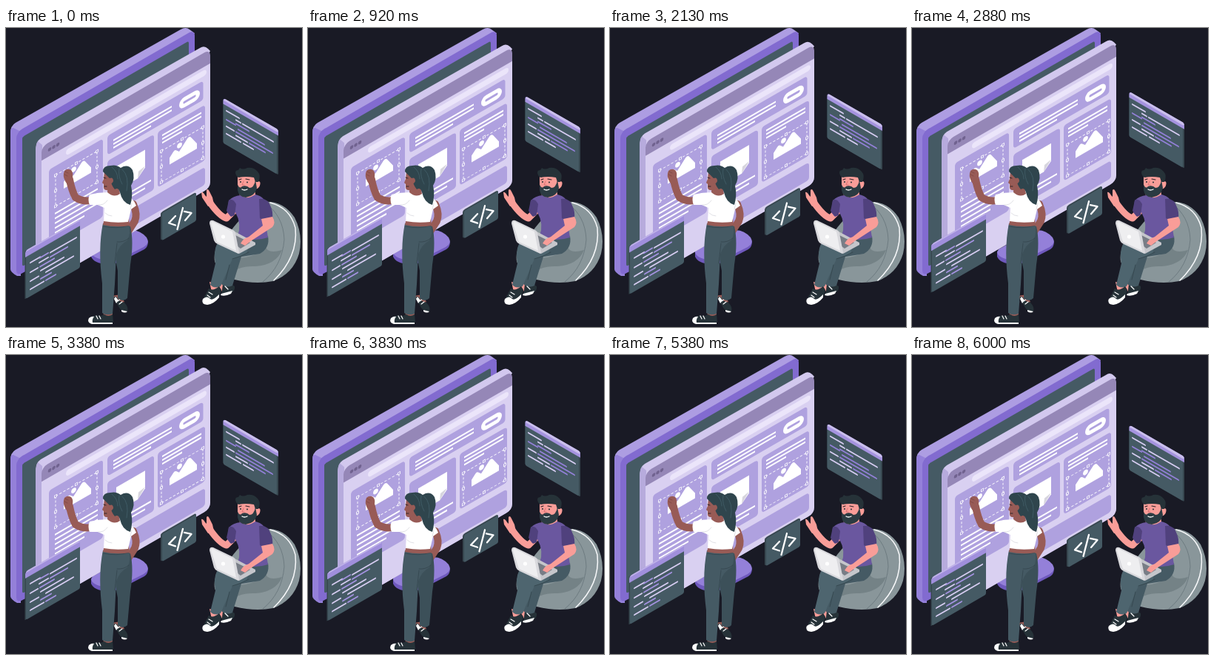
An HTML page that plays this animation: 400 px wide and 404 px high, repeating every 6.04 s.

```html
<!DOCTYPE html>
<html lang="en">
<head>
<meta charset="utf-8">
<title>Floating web design panels</title>
<style>
html,body{margin:0;width:100%;height:100%;overflow:hidden;background:#191a25}
svg{display:block;width:100vw;height:100vh}
.stroke{fill:none;stroke-linecap:round;stroke-linejoin:round}
.card{fill:#afa1df}
.slate{fill:#455a64}
.skin{fill:#985b56}
.pink{fill:#f99d98}
.ink{fill:#263238}
.white{fill:#fff}
</style>
</head>
<body>
<svg viewBox="0 0 400 404" preserveAspectRatio="none">
<defs>
  <g id="picture">
    <rect x="67" y="237.5" width="56" height="42" fill="none" stroke="#fff" stroke-width=".9" stroke-dasharray="3 2.2"/>
    <path fill="#afa1df" stroke="#fff" stroke-width=".8" d="M65.500 236h3v3h-3zM93.500 236h3v3h-3zM121.500 236h3v3h-3zM65.500 257h3v3h-3zM121.500 257h3v3h-3zM65.500 278h3v3h-3zM93.500 278h3v3h-3zM121.500 278h3v3h-3z"/>
    <path class="white" d="M78 262V253L83 248Q85 246 87 248L91 252 102 241Q105 239 107 242L115 255V262Z"/>
    <circle class="white" cx="91.500" cy="244" r="3.400"/>
  </g>
</defs>

<!-- monitor -->
<path fill="#6f59bd" d="M115 302V309Q119 318 136 319 150 319 160 313L187 299Q192 296 192 288L150 280Z"/>
<path fill="#9480d9" d="M117 299L160 275Q178 269 190 283 195 291 186 296L160 309Q148 315 133 313 117 311 115 303Z"/>
<path fill="#ad9de2" d="M6 142Q6 132 13 128L236 2Q243-2 248 2L255 7 240 30 16 155Z"/>
<path fill="#9480d9" d="M6 141Q6 134 10 135L20 140V335L15 335Q6 330 6 326Z"/>
<g class="iso">
  <rect x="14" y="149" width="241" height="195" rx="8" fill="#826bd0"/>
  <rect class="slate" x="22" y="160" width="225" height="175" rx="3"/>
</g>

<g id="float">
  <!-- browser window -->
  <path fill="#d2c8ee" d="M40 168Q40 153 47 149L262 27Q268 23 273 28L276 31 260 60 48 185V341L40 337Z"/>
  <path fill="#b7abdd" d="M40 168Q40 156 43 153L49 158V341L40 337Z"/>
  <g class="iso">
    <rect x="48" y="188" width="228" height="187" rx="8" fill="#9587b7"/>
    <path fill="#d9d0f1" d="M48 207H276V367Q276 375 268 375H56Q48 375 48 367Z"/>
    <g fill="#70628f"><circle cx="59" cy="198" r="2.300"/><circle cx="64.500" cy="198" r="2.300"/><circle cx="70" cy="198" r="2.300"/></g>
    <rect x="81" y="211.500" width="190" height="8" rx="4" fill="#ebe5fa"/>
    <g class="card">
      <rect x="58" y="225" width="73" height="106" rx="4"/>
      <rect x="137" y="225" width="129.500" height="26" rx="4"/>
      <rect x="137" y="259" width="63" height="75" rx="4"/>
      <rect x="205" y="259" width="64" height="75" rx="4"/>
      <rect x="137" y="343" width="132" height="24" rx="4"/>
    </g>
    <rect class="white" x="234" y="232.500" width="28" height="14" rx="7"/>
    <path class="stroke" stroke="#afa1df" stroke-width="3.200" d="M241 239.500H255"/>
    <use href="#picture"/>
    <use href="#picture" x="143" y="50"/>
    <path class="white" d="M149 273H188V297L178 306H149Z"/>
    <path fill="#d7d5de" d="M188 295L178 306 179 297Z"/>
    <path id="copy" class="stroke" stroke="#fff" stroke-width="2.300" style="stroke-linecap:butt"/>
  </g>

  <!-- left code panel -->
  <g class="iso">
    <rect x="25.500" y="316" width="3" height="65" fill="#37474f"/>
    <rect class="slate" x="27" y="319" width="73" height="62.500" rx="2"/>
    <path fill="#a08fdc" d="M26 325V319Q26 316 29 316H98Q100 316 100 319V325Z"/>
    <path fill="#c0b3e9" d="M27 317.500Q28 316 30 316H98L100 318H28Z"/>
    <path id="leftLight" class="stroke" stroke="#d7cdf2" stroke-width="2"/>
    <path id="leftDeep" class="stroke" stroke="#a593e2" stroke-width="2"/>
  </g>

  <!-- right code panel -->
  <g class="osi">
    <rect x="293.500" y="-74" width="74.500" height="60" rx="2" fill="#37474f"/>
    <rect class="slate" x="293.500" y="-72" width="72.500" height="58" rx="2"/>
    <path fill="#a593df" d="M293.500-67V-72Q294-75 297-75H366Q368-75 368-72V-67Z"/>
    <path fill="#cabfec" d="M294-72Q295-75 297-75H366L368-73 366-71Z"/>
    <path id="rightLight" class="stroke" stroke="#d7cdf2" stroke-width="2"/>
    <path id="rightDeep" class="stroke" stroke="#9380d8" stroke-width="2"/>
  </g>

  <!-- tag panel -->
  <g class="iso">
    <rect x="209" y="370" width="48" height="38" rx="3" fill="#37474f"/>
    <rect class="slate" x="211" y="372" width="46" height="37" rx="2"/>
  </g>
  <path class="stroke" stroke="#fff" stroke-width="2.300" d="M229 254L220 263.500 229 266.500M239 243L231.500 272M241 248L250.500 250 242 260"/>
</g>

<!-- woman -->
<g>
  <path class="stroke" stroke="#985b56" stroke-width="10" d="M172 238Q178 252 174 261L165 275"/>
  <path class="skin" d="M143 362L155 360 160 370 152 374ZM131 382H144L144 393 133 394Z"/>
  <path class="ink" d="M146 366Q145 362 149 363L154 369 160 371Q166 377 164 383 158 385 153 378Z"/>
  <path class="white" d="M146 366L148 363 152 368 149 372ZM156 381L164 383Q161 386 156 383Z"/>
  <path class="ink" d="M112 392Q119 387 128 389L133 387Q138 391 144 387L145 397Q140 401 129 400H115Q110 398 112 392Z"/>
  <path class="white" d="M112 392Q116 389 119 390 116 394 117 398H144V400H116Q109 398 112 392Z"/>
  <path class="stroke" stroke="#fff" stroke-width="1.200" d="M122 389L124 393M126 389L128 393M151 369L155 366M153 373L157 370"/>
  <path fill="#3c5059" d="M148 270L168 268Q173 288 168 320L164 365Q158 371 151 365L151 328 144 292Z"/>
  <path class="slate" d="M131 264H166Q169 278 164 287 153 293 149 306L147 346 144 386Q136 389 130 385L130 345Q124 298 131 264Z"/>
  <path class="stroke" stroke="#34464e" stroke-width=".8" d="M150 289Q159 290 166 284M150 291L147 318M131 268Q149 272 166 267"/>
  <path class="skin" d="M133 257H166L167 267Q149 270 131 266Z"/>
  <path class="stroke" stroke="#985b56" stroke-width="10" d="M119 232Q105 236 94 229 89 220 86 205"/>
  <path class="skin" d="M80 207Q76 199 79 193 83 189 88 192 91 195 90 201L91 210 84 213Z"/>
  <path class="stroke" stroke="#7d4643" stroke-width=".8" d="M80 194L84 196M79 198L83 200"/>
  <path class="white" d="M113 225Q125 222 138 222L158 222Q172 229 176 240L169 245 165 262Q148 264 132 261L133 243 124 239 113 239Q110 232 113 225Z"/>
  <path class="stroke" stroke="#d9d9df" stroke-width=".8" d="M137 233Q132 240 125 239M168 245L170 237M134 250Q138 254 143 254"/>
  <path class="skin" d="M138 211L151 210 154 224Q146 230 137 222Z"/>
  <path class="skin" d="M133 194L132 204 130 209 132 211 132 216Q133 220 139 219 149 216 151 205L149 192Z"/>
  <path fill="#2f454d" d="M131 194Q131 186 141 186 149 184 155 189 165 183 171 192 175 203 169 213 172 226 168 239 157 236 154 222 152 215 147 218 142 212 141 204 136 199Z"/>
  <path class="stroke" stroke="#43606a" stroke-width=".8" d="M143 188Q151 194 151 204M157 191Q167 200 163 220M153 190Q151 200 157 211"/>
  <path class="skin" d="M140 203Q145 201 145 207 143 212 140 209Z"/>
  <path class="stroke" stroke="#30242a" stroke-width="1" d="M132 202L135 203M133 214L136 214"/>
</g>

<!-- beanbag -->
<path fill="#89969a" d="M282 315Q279 296 298 283 316 253 347 235 374 232 390 256 402 280 396 305 388 332 361 342 337 347 309 340 287 333 282 315Z"/>
<path fill="#748286" d="M282 314Q292 308 310 311 339 311 351 294 352 306 373 300 365 320 337 322 313 321 299 335 285 329 282 314Z"/>
<path class="stroke" stroke="#f7f8fa" stroke-width="1.500" d="M357 236Q384 243 391 270 395 309 362 341"/>
<path class="stroke" stroke="#66747a" stroke-width=".8" d="M350 236Q375 254 376 286 373 322 347 343"/>

<!-- man -->
<g>
  <path class="pink" d="M285 344L300 340 305 352 292 356ZM275 343L289 347 286 358 278 357Z"/>
  <path class="ink" d="M293 346Q298 350 303 345L309 349Q310 356 303 359L291 362Z"/>
  <path class="white" d="M291 359L306 355 304 359Q296 363 290 361Z"/>
  <path class="slate" d="M299 292Q323 281 354 281 357 297 343 305L318 309 306 348Q298 352 291 346L296 314Z"/>
  <path fill="#4e656f" d="M285 292Q303 283 330 288L325 305 306 312 290 349Q282 353 276 347L283 318Q280 302 285 292Z"/>
  <path class="stroke" stroke="#35474f" stroke-width=".9" d="M306 312Q318 309 328 303M302 320L297 340"/>
  <path class="ink" d="M274 352Q280 356 288 349L291 354Q289 364 283 369L273 374Q264 373 266 367Z"/>
  <path class="white" d="M266 366Q272 361 276 366 279 369 288 360L288 364Q281 373 272 374 263 373 266 366Z"/>
  <path class="stroke" stroke="#fff" stroke-width="1.200" d="M274 357L279 360M272 361L276 364M296 349L300 353"/>
  <path class="stroke" stroke="#f99d98" stroke-width="9" d="M309 246L298 257Q289 255 275 235"/>
  <path class="pink" d="M273 241L265 229 264 222Q266 221 269 226L271 228 271 219Q273 216 275 221L279 229 281 238Z"/>
  <path class="pink" d="M314 217H336L338 233Q328 240 317 232Z"/>
  <path fill="#6a579f" d="M301 233Q307 227 317 226 325 233 337 225 351 228 354 244L351 264 354 283Q333 290 313 281 319 265 310 249L303 254 299 249Z"/>
  <path fill="#50417d" d="M342 231Q354 229 358 242 361 249 360 257 350 262 343 257Z"/>
  <path fill="#50417d" d="M301 233Q306 229 311 238L309 253 304 255 298 247Z"/>
  <path class="pink" d="M345 258L360 255Q365 263 360 269 343 280 326 291L318 294Q315 291 319 287L327 283 347 267Z"/>
  <path fill="#c5c6cb" d="M287 291L309 275 337 290 337 293 315 305Z"/>
  <path fill="#787d86" d="M310 280L330 290 317 298 309 292Z"/>
  <path class="pink" d="M317 291Q321 283 330 282L332 287 323 294Z"/>
  <path fill="#d9d9dd" d="M275 264Q275 259 280 260L307 273Q309 274 310 277L315 303 314 305 286 292Q282 290 281 287Z"/>
  <path fill="#eeeef0" d="M277 264Q277 261 280 262L306 275 311 301 285 289Z"/>
  <circle class="white" cx="293.500" cy="282" r="2.600"/>
  <path class="pink" d="M313 198Q325 194 337 200L340 207Q345 206 343 213 341 218 337 217 333 229 321 228 313 224 313 211Z"/>
  <path fill="#2b3b42" d="M313 212Q316 218 319 214 325 212 329 216 335 216 337 206L339 216Q337 227 324 229 314 228 313 219Z"/>
  <path class="ink" d="M311 199Q308 192 314 192L316 189Q320 192 326 189 335 188 340 194 345 199 341 208L337 208 335 202Q324 200 314 202Z"/>
  <path class="stroke" stroke="#30242a" stroke-width="1.200" d="M315 205L318 204M324 204L329 205"/>
  <circle class="ink" cx="317" cy="208" r="1"/><circle class="ink" cx="326" cy="208.500" r="1"/>
  <path class="stroke" stroke="#d76e70" stroke-width=".9" d="M321 207L319 212 322 212"/>
  <path class="stroke" stroke="#fff" stroke-width="1.300" d="M319 218Q322 220 326 218"/>
</g>
</svg>
<script>
const PERIOD = 6040, RISE = 9.2, SLOPE = Math.tan(Math.PI / 6);
const el = id => document.getElementById(id);
const shear = (cls, k) => document.querySelectorAll(cls).forEach(
  g => g.setAttribute('transform', `matrix(1 ${k} 0 1 0 0)`));
// Each row is [start x, end x, height on the sheared plane]
const rules = (id, rows) => el(id).setAttribute('d',
  rows.map(([a, b, y]) => `M${a} ${y}H${b}`).join(''));

shear('.iso', -SLOPE);
shear('.osi', SLOPE);

rules('copy', [
  ...[289, 295.5, 302, 308.5, 315].map((y, i) => [66, i < 4 ? 124 : 106, y]),
  [145, 224, 235.5], [145, 224, 240.5], [145, 196, 245.5],
  [211, 264, 267], [211, 264, 272], [211, 238, 277],
  [145, 196, 319], [145, 188, 325]
]);
rules('leftLight', [
  [33, 46, 336], [60, 95, 338], [45, 57, 343], [33, 43, 349],
  [47, 78, 355], [33, 44, 361], [54, 91, 361], [33, 51, 372]
]);
rules('leftDeep', [
  [46, 57, 337], [60, 83, 344], [46, 65, 349], [47, 61, 366], [54, 67, 372]
]);
rules('rightLight', [
  [298, 315, -60], [311, 317, -55], [320, 361, -55],
  [298, 308, -39], [311, 326, -34], [298, 317, -29], [321, 334, -29]
]);
rules('rightDeep', [
  [311, 328, -50], [298, 310, -48], [314, 349, -44],
  [311, 360, -39], [329, 350, -34]
]);

function draw(now) {
  const t = now % PERIOD / PERIOD;
  const lift = RISE * (1 - Math.abs(1 - 2 * t));
  el('float').setAttribute('transform', `translate(0 ${-lift})`);
  requestAnimationFrame(draw);
}
draw(performance.now());
</script>
</body>
</html>
```
